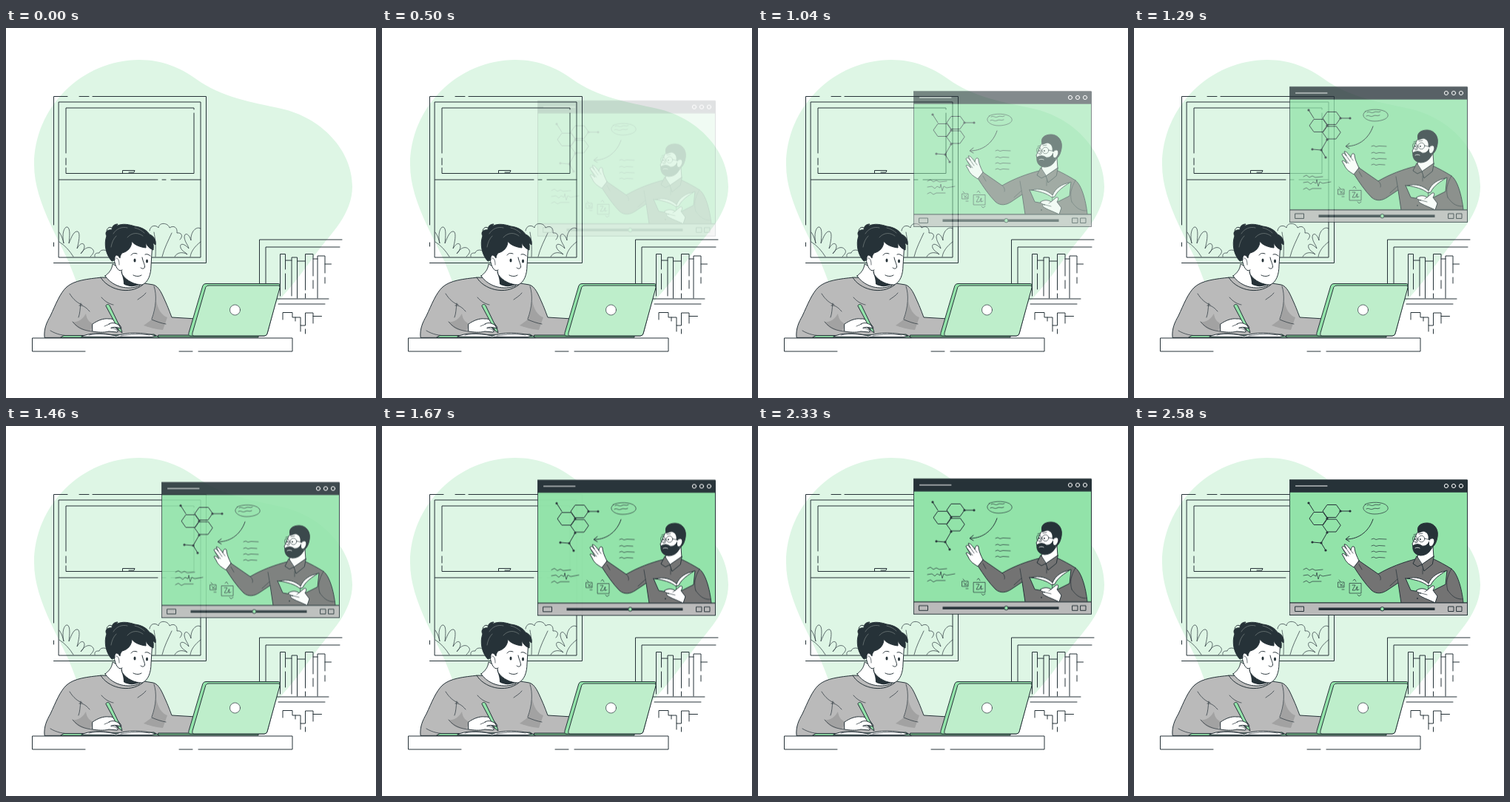
Animation of 500x500 px, one loop 2620 ms. Source, as an HTML page:

```html
<!DOCTYPE html>
<html lang="en">
<head>
<meta charset="utf-8">
<title>Online lesson</title>
<style>
  html, body { margin: 0; width: 100%; height: 100%; overflow: hidden; background: #fff; }
  svg { display: block; width: 100vw; height: 100vh; }
  .ink { fill: none; stroke: #263238; stroke-width: 1; stroke-linecap: round; stroke-linejoin: round; }
  .ink .thin { stroke-width: .7; }
  .white { fill: #fff; }
  .dark { fill: #263238; }
  .green { fill: #92e3a9; }
  .pale { fill: #beeecb; }
  .grey { fill: #bababa; }
  .shade { fill: #a2a2a2; stroke: none; }
  .shirt { fill: #737373; }
  .bare { stroke: none; }
</style>
</head>
<body>
<svg viewBox="0 0 500 500">
  <path fill="#def6e5" d="M180 43C212 43 236 54 257 69C292 94 331 100 372 109C426 121 468 165 468 214C468 252 438 279 421 302C402 328 386 350 366 371C340 398 300 418 240 418H165C120 408 105 369 91 332C77 292 38 238 38 185C38 107 103 43 180 43Z"/>

  <!-- Wall window -->
  <g class="ink">
    <path d="M64.5 266V92.5H83M99 92.5H112M117 92.5H270.5V317.5H64.5M64.5 290V295"/>
    <path d="M71.5 100H263V310H71.5Z"/>
    <path d="M81 169V108H254V110M254 115V196.500H81V189M81 185V176"/>
    <path d="M71.500 205H205M211 205H216M223 205H263"/>
    <path d="M157.500 196V192.500H174L173 195H166"/>
    <g class="thin">
      <path d="M72 276C75 280 77 286 78 291C75 277 79 268 83 269C87 271 86 281 85 291C89 281 92 274 97 275C101 277 98 291 96 298C101 289 106 290 106 296C105 300 104 302 101 305C108 294 115 296 117 299C120 302 118 305 114 309M72 289C80 294 86 301 91 309M120 309C119 304 123 304 126 304C127 300 132 299 136 301"/>
      <path d="M194 274C195 266 203 266 206 270C207 262 219 263 221 270C227 266 232 270 231 277C237 276 240 281 235 286M200 276C201 283 203 290 202 309M224 277C219 288 214 297 211 309"/>
      <path d="M263 271C257 267 249 276 250 287C247 277 241 276 241 283C242 290 246 293 247 298C240 290 234 291 236 297C238 302 243 303 245 306C239 302 231 303 228 309M263 289C255 295 250 302 249 309"/>
    </g>
  </g>

  <!-- Bookshelf -->
  <g class="ink">
    <path d="M342.500 345V286H454M351 345V296H451M364 366H436M368 373H431"/>
    <path d="M370.500 362V305.500H377.500V326M377.500 332V353M377.500 314H386M386 362V310H393.500V365M393.500 315H404M404.500 354V305.500H415V335M404.500 359V365M415 341V352M415 312H421M421 365V308H431V331M431 319H439.500M431 337V345"/>
    <path d="M374 394V384.500H387V391H398V402H404.500V385H415V399M415 389.500H426.500M398 402V410M404.500 407V413M391 391V396"/>
  </g>

  <!-- Desk -->
  <path class="white" d="M35.500 419H387V437H35.500Z"/>
  <path class="ink" d="M107 437H35.500V419H387V437H260M252 437H234"/>

  <!-- Student -->
  <g class="ink">
    <path class="grey" d="M52 418C51 406 55 398 60 389C67 374 73 358 82 350C92 341 110 339 130 337C151 338 180 344 199 347C207 349 211 360 216 371C220 380 222 386 224 391L257 393L249 416L150 418Z"/>
    <path class="shade" d="M90 397C98 398 104 393 108 386C109 395 114 398 118 400L114 409C105 410 96 407 90 397ZM197 394C200 387 202 379 203 369C205 380 211 389 218 391L212 408C201 407 192 404 186 402Z"/>
    <path class="white" d="M134 335C139 331 143 327 144 319L171 332L181 348C165 355 144 350 134 335Z"/>
    <path d="M128 337C137 353 166 362 185 347"/>
    <path class="dark bare" d="M153 325C158 337 168 344 180 347C173 350 165 350 159 346C159 339 157 333 153 325Z"/>
    <path class="white" d="M151 300L157 333C163 342 174 347 184 347C192 344 196 333 196 321L198 289L173 283Z"/>
    <path class="white" d="M154 308C148 303 145 309 147 317C149 325 153 330 157 327"/>
    <path class="thin" d="M149 311C152 311 153 315 153 320"/>
    <path class="dark" d="M143 315C135 307 132 292 136 281C133 276 137 272 143 273C143 268 146 265 151 265L149 268C157 263 168 266 174 268C184 269 191 274 194 279C200 281 203 287 202 293L198 290C200 294 199 297 199 300C194 298 191 295 189 290V297C181 296 173 293 170 288C170 296 165 302 157 304C155 306 154 309 154 311C150 304 146 307 147 313Z"/>
    <path d="M136 274C137 270 140 268 143 270" />
    <g stroke="#87918f" stroke-width=".6">
      <path d="M145 278C149 271 157 268 164 270M142 296C143 290 145 285 149 281M164 283C170 276 179 276 185 281M174 270C179 271 184 274 187 277"/>
    </g>
    <ellipse class="dark bare" cx="174" cy="314" rx="1.500" ry="2.500"/>
    <ellipse class="dark bare" cx="190.500" cy="315" rx="1.500" ry="2.500"/>
    <path d="M169 307C171 304 174 304 177 305M188 306C190 305 193 306 195 308M184 310C185 316 189 322 187 324C186 326 183 325 182 324M172 334C176 336 180 336 183 334"/>
    <path class="thin" d="M86 359C91 367 97 372 103 374M129 364C134 370 140 373 145 374M113 383C108 377 103 374 99 375M200 349C204 361 203 377 197 393M178 367C182 364 186 362 189 358M90 397C98 407 108 409 116 410M197 394C204 397 210 399 216 400M60 409C68 414 78 416 88 416M101 372C100 380 100 386 98 391"/>
  </g>

  <!-- Notebook, hand and pen -->
  <g class="ink">
    <path class="green" d="M74 418L78 415.500H107L200 414L207 418Z"/>
    <path class="white" d="M102 417C112 412 129 411 149 416C163 411 185 411 203 416L197 417.500H152L149 418L144 417.500Z"/>
    <path class="thin" d="M112 415C126 412 138 414 149 416M155 416C169 414 180 413 194 415"/>
    <path class="white" d="M117 400C124 395 132 392 139 393C146 392 151 398 154 402C157 405 156 408 153 408L148 405C151 408 153 410 150 411L139 410C132 412 123 411 117 410Z"/>
    <path class="green" d="M135 375C136 373 139 373 140 375L156 408L157 412L153 409Z"/>
    <path class="white" d="M139 400C144 397 149 399 153 402L155 406C150 404 146 404 142 405"/>
    <path class="thin" d="M142 406C146 405 149 407 151 410M133 403L140 400"/>
  </g>

  <!-- Laptop -->
  <g class="ink">
    <path fill="#69a67b" d="M206 415H341V418H206Z"/>
    <path class="green" d="M266 348Q267 345.500 270 345.500H368Q371 345.500 370 349L353 413Q352 416 349 416H249Q246 416 247 412Z"/>
    <path class="pale" d="M270 350Q271 348 274 348H368Q371 348 370 351L353 413Q352 416 349 416H254Q251 416 252 412Z"/>
    <circle class="white" cx="309.500" cy="381" r="7" stroke-width=".7"/>
  </g>

  <!-- Lesson player -->
  <g id="player" class="ink" opacity="0">
    <path class="green" d="M210.500 89H450.500V239H210.500Z"/>
    <path class="dark" d="M210.500 73H450.500V89H210.500Z"/>
    <path stroke="#fff" d="M218.500 81H261"/>
    <g stroke="#fff">
      <circle cx="422" cy="81" r="2.600"/><circle cx="432" cy="81" r="2.600"/><circle cx="442" cy="81" r="2.600"/>
    </g>

    <!-- Board notes -->
    <g id="rings"></g>
    <path d="M236 104L243 115M279 115H292M261 144L253 158L241 157M253 158L259 168"/>
    <g id="atoms" class="dark bare"></g>
    <path class="thin" d="M312 106C319 102 337 102 342 108C347 115 335 119 325 119C313 119 305 111 313 106M315 107C319 105 320 109 324 107S329 108 333 106M314 112C318 110 319 114 323 112S328 113 332 111"/>
    <path d="M323 126C318 141 305 153 287 153M291 149L286 153L291 156"/>
    <g id="notes"></g>
    <path class="thin" d="M229 194L233 192L237 195L241 193L245 195L255 194M229 202L235 201L239 204L242 201L246 203L247 198L249 207L251 201L255 203L266 201M229 211L233 209L237 212L241 210L253 210"/>
    <path class="thin" d="M276 211H284V218H276ZM278 213L280 215L282 213M279 216H283M277 208L279 210M281 221H284M291.500 212.500H307V226H291.500ZM295 215H299L295 222H299C301 220 300 217 302 217L301 222L304 221M296 209L298 207L300 210M302 228L304 230L307 228"/>

    <!-- Teacher -->
    <path class="shirt" d="M380 180C364 184 345 191 330 200L304 182L297 190C304 201 312 213 321 222C328 228 336 226 342 222L357 212L361 239H445C443 219 437 199 429 193C421 188 412 183 403 179Z"/>
    <path class="thin" d="M357 212L354 194M304 187L308 194M330 200C333 202 334 206 333 208M346 216L356 207M429 193C423 203 421 213 424 222M424 222C429 229 434 234 443 234M390 193V200"/>
    <path class="white" d="M304 182L297 191C291 187 287 185 284 178L281 173C283 171 286 175 288 176L281 164C282 161 285 163 287 166L284 160C287 159 291 165 293 168C293 164 296 161 298 164C298 169 301 176 304 182Z"/>
    <path class="thin" d="M287 166L292 173M283 167L290 176M293 168L296 172"/>
    <path class="white" d="M384 172L382 182L389 188L405 177L404 163Z"/>
    <path class="shirt" d="M382 176L377 186L383 190L389 187ZM405 176L389 187L392 196L403 187Z"/>
    <path class="white" d="M383 144C380 149 378 156 376 159C378 167 382 173 390 173C400 171 406 163 408 152L403 139Z"/>
    <path class="dark" d="M384 144C381 135 388 131 396 131C406 131 412 140 410 150C409 156 407 161 403 164C404 157 402 153 398 153C399 147 396 143 391 142Z"/>
    <path class="dark" d="M377 162C380 159 386 159 389 162C394 163 397 160 399 156L403 160C402 170 395 175 387 175C379 174 376 168 377 162Z"/>
    <path class="white" d="M399 154C403 149 408 153 405 159C403 163 400 164 399 161"/>
    <path stroke="#fff" stroke-width=".8" d="M380 165C382 164 384 164 386 165"/>
    <g class="thin">
      <circle cx="388.500" cy="152.500" r="4.300"/>
      <ellipse cx="379.500" cy="152.500" rx="3" ry="4"/>
      <path d="M393 152L400 154M383 152V157L380 158M385 146L390 145M378 147L381 146"/>
    </g>
    <circle class="dark bare" cx="387" cy="153" r="1"/>
    <circle class="dark bare" cx="380" cy="153" r="1"/>
    <path class="green" d="M367 206L374 222L397 226L421 214L423 195C411 201 404 205 398 213C389 209 379 206 367 206Z"/>
    <path class="white" d="M370 206C380 203 391 206 398 213C402 203 411 198 421 196C414 201 405 206 401 215L397 216C390 210 380 208 370 206Z"/>
    <path class="thin" d="M398 214L397 226"/>
    <path class="white" d="M382 222C386 219 392 219 396 222L403 216C406 215 407 218 404 222L410 230L407 239C399 235 390 232 386 229C383 227 385 225 388 226C384 225 381 224 382 222Z"/>
    <path class="thin" d="M388 226L396 228M396 222L393 224"/>
    <circle class="dark bare" cx="383" cy="233" r=".9"/>

    <!-- Controls -->
    <path class="grey" d="M210.500 239H450.500V255.500H210.500Z"/>
    <path d="M218 244H229.500V250.500H218ZM425 244H432V250.500H425ZM436 244H443V250.500H436Z"/>
    <path stroke-width="3.500" stroke-linecap="butt" d="M249.500 247.200H406.500"/>
    <circle class="green" cx="335.500" cy="247.200" r="2.700"/>
    <path d="M210.500 73H450.500V255.500H210.500Z"/>
  </g>
</svg>
<script>
  const LOOP = 2620, RISE = 2510;
  const byId = id => document.getElementById(id);

  const hexagon = ([cx, cy], r = 12) => {
    const points = Array.from({ length: 6 }, (_, i) => {
      const a = i * Math.PI / 3;
      return `${cx + r * Math.cos(a)},${cy + r * .82 * Math.sin(a)}`;
    });
    return `<polygon points="${points.join(' ')}"/>`;
  };
  byId('rings').innerHTML = [[267, 115], [249, 125], [267, 134.5]].map(c => hexagon(c)).join('');

  const atoms = [[236, 104], [292, 115], [279, 115], [261, 125], [261, 144], [253, 158], [241, 157], [259, 168]];
  byId('atoms').innerHTML = atoms.map(([x, y]) => `<circle cx="${x}" cy="${y}" r="1.6"/>`).join('');

  byId('notes').innerHTML = [153, 162, 170, 178].map((y, i) =>
    `<path class="thin" d="M321 ${y}l3 -1 3 1.5 4 -1 ${i % 2 ? 8 : 10} .5"/>`).join('');

  // Rise and fade in with a slight overshoot, then hold until the loop restarts.
  byId('player').animate([
    { offset: 0, transform: 'translateY(30px)', opacity: 0, easing: 'cubic-bezier(.36,-.01,.5,1.38)' },
    { offset: RISE / LOOP, transform: 'translateY(0px)', opacity: 1 },
    { offset: 1, transform: 'translateY(0px)', opacity: 1 }
  ], { duration: LOOP, iterations: Infinity });
</script>
</body>
</html>
```
